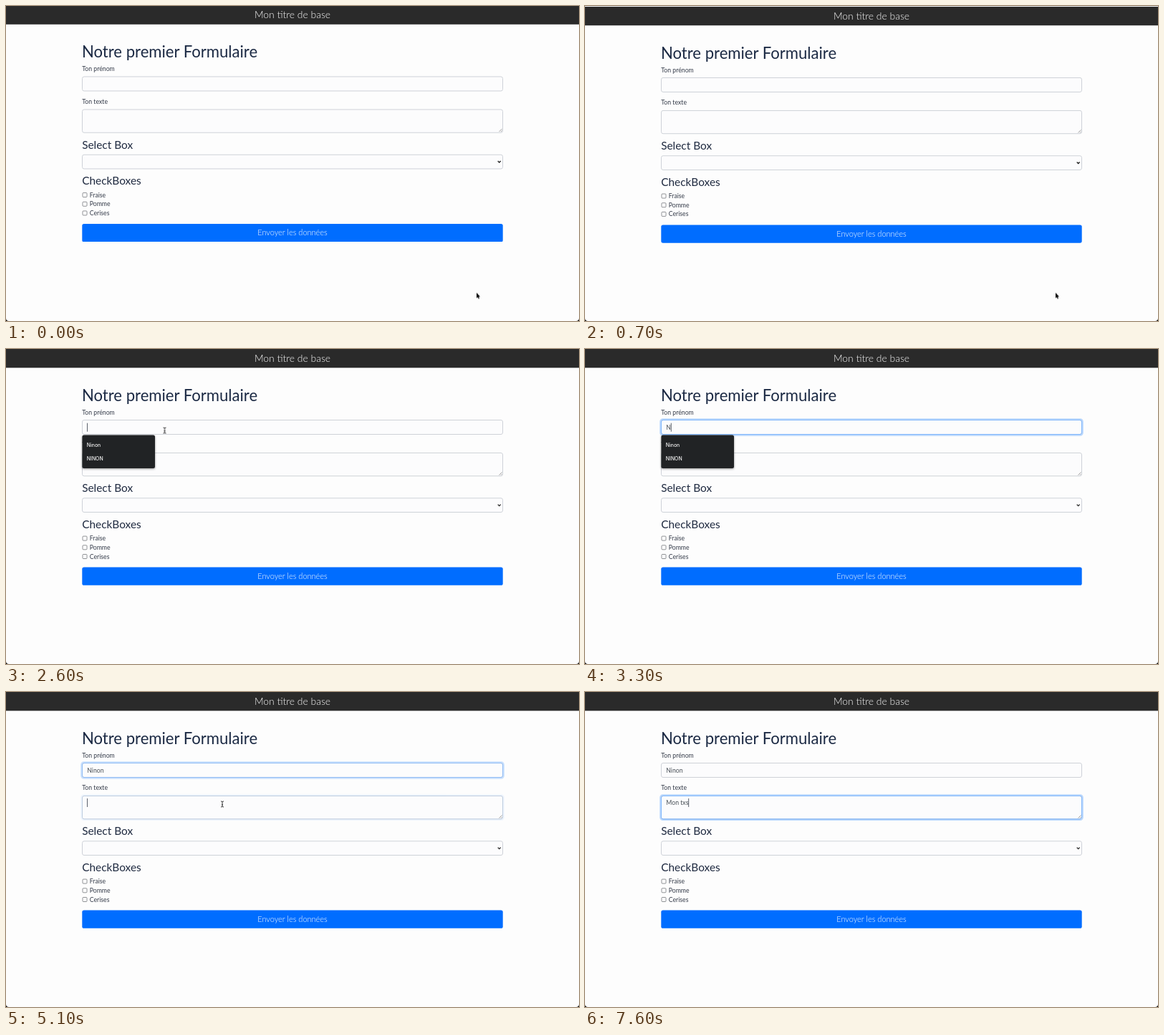
An HTML page that plays this animation: 800 by 441 pixels, repeating every 8000 ms.

```html
<!DOCTYPE html>
<html lang="fr">
<head>
<meta charset="utf-8">
<title>Formulaire</title>
<style>
html, body { margin: 0; width: 100%; height: 100%; overflow: hidden; background: #000; }
svg { display: block; width: 800px; height: 441px; }
text { font-family: Lato, "Open Sans", sans-serif; white-space: pre; }
.title { font-size: 13.9px; font-weight: 300; fill: #fff; text-anchor: middle; }
.h1 { font-size: 22.1px; fill: #1c2a44; }
.h2 { font-size: 15.4px; fill: #1f2a40; }
.label { font-size: 8.7px; fill: #343b49; }
.value { font-size: 8.7px; fill: #495057; }
.send { font-size: 11px; font-weight: 300; fill: #fff; text-anchor: middle; }
.hint { font: 500 6.9px Inter, sans-serif; fill: #f4f4f4; }
.box { fill: #fcfcfd; stroke: #ced2d8; }
.check { fill: #fff; stroke: #74777c; stroke-width: .8; }
.ring { fill: none; stroke: #80b6fb; }
.halo { fill: none; stroke: #0a78ff; stroke-opacity: .27; stroke-width: 2; }
.caret { fill: #343b49; }

.page, .cursor, .arrow, .beam, .popup, .focus { animation: 8s -30ms linear infinite; }
.page { animation-name: scroll; }
.cursor { animation-name: move; }
.arrow, .beam, .popup { animation-timing-function: step-end; }
.arrow { animation-name: arrow; }
.beam { animation-name: beam; }
.popup { animation-name: popup; }
.first { animation-name: first; }
.second { animation-name: second; }

@keyframes scroll {
  0% { transform: translateY(-.5px); }
  5% { transform: translateY(-1px); animation-timing-function: ease-in-out; }
  8.75% { transform: translateY(1.1px); animation-timing-function: ease-out; }
  12.5%, 100% { transform: none; }
}
@keyframes move {
  0%, 12% { transform: translate(657px, 401.5px); animation-timing-function: ease-in-out; }
  16.25%, 19.5% { transform: translate(435px, 343px); animation-timing-function: ease-in-out; }
  27.5%, 55% { transform: translate(221.5px, 114px); animation-timing-function: step-end; }
  56.25% { transform: translate(313.2px, 151px); animation-timing-function: ease-out; }
  63%, 100% { transform: translate(302px, 157px); }
}
@keyframes arrow { 0% { opacity: 1; } 24.75%, 100% { opacity: 0; } }
@keyframes beam {
  0% { opacity: 0; }
  24.75% { opacity: 1; }
  41.25% { opacity: 0; }
  56.25% { opacity: 1; }
  72.5%, 100% { opacity: 0; }
}
@keyframes popup { 0% { opacity: 0; } 32.5% { opacity: 1; } 63.75%, 100% { opacity: 0; } }
@keyframes first {
  0%, 32.9% { opacity: 0; }
  34.75%, 63.75% { opacity: 1; }
  65.6%, 100% { opacity: 0; }
}
@keyframes second { 0%, 63.75% { opacity: 0; } 65.6%, 100% { opacity: 1; } }
</style>
</head>
<body>
<svg viewBox="0 0 800 441">
  <path fill="#fdfdfd" d="M0 0H800V437Q800 441 796 441H4Q0 441 0 437Z"/>
  <g class="page">
    <rect y="0" width="800" height="26.3" fill="#2a2a2a"/>
    <text class="title" x="400" y="17.7">Mon titre de base</text>
    <text class="h1" x="106" y="72.6">Notre premier Formulaire</text>
    <text class="label" x="106.3" y="91.8">Ton prénom</text>
    <rect class="box" x="106.5" y="99.5" width="587" height="20" rx="2.5"/>
    <text class="label" x="106.3" y="137.2">Ton texte</text>
    <rect class="box" x="106.5" y="145.5" width="587" height="32.3" rx="2.5"/>
    <path d="M688.5 176.5l4-4M691 176.5l1.5-1.5" stroke="#777" stroke-width=".7"/>
    <text class="h2" x="106.2" y="200.2">Select Box</text>
    <rect class="box" x="106.5" y="208.8" width="587" height="19.7" rx="2.5"/>
    <path d="M686.7 217.6l2 2 2-2" fill="none" stroke="#222" stroke-width="1.3"/>
    <text class="h2" x="106.2" y="251">CheckBoxes</text>
    <g id="checks"></g>
    <rect x="106.3" y="305.6" width="587.4" height="25.2" rx="2.6" fill="#006dff"/>
    <text class="send" x="400" y="321.8">Envoyer les données</text>

    <g class="focus first">
      <rect class="halo" x="105.2" y="98.2" width="589.6" height="22.6" rx="3.5"/>
      <rect class="ring" x="106.5" y="99.5" width="587" height="20" rx="2.5"/>
    </g>
    <g class="focus second">
      <rect class="halo" x="105.2" y="144.2" width="589.6" height="34.9" rx="3.5"/>
      <rect class="ring" x="106.5" y="145.5" width="587" height="32.3" rx="2.5"/>
    </g>
    <text class="value" id="name" x="113.3" y="112.5"></text>
    <text class="value" id="note" x="113.3" y="158"></text>
    <rect class="caret" id="caret" width=".8" height="12"/>
  </g>

  <g class="popup">
    <rect x="106.4" y="120.5" width="101.6" height="46.4" rx="2.5" fill="#212325"
      style="filter: drop-shadow(0 1px 1.5px rgba(0,0,0,.4))"/>
    <text class="hint" x="112.8" y="136.5">Ninon</text>
    <text class="hint" x="112.8" y="155.6">NINON</text>
  </g>

  <g class="cursor">
    <path class="arrow" d="M0 0V7.4L1.7 5.9 2.8 8.5 4 8 2.9 5.4H5.1Z"
      stroke="#fff" stroke-width=".6" paint-order="stroke"/>
    <path class="beam" d="M-2-4Q0-4 0-3Q0-4 2-4M0-3V3M-2 4Q0 4 0 3Q0 4 2 4M-1 .9H1"
      fill="none" stroke="#222" stroke-width=".9"/>
  </g>
</svg>
<script>
const $ = id => document.getElementById(id);

$('checks').innerHTML = ['Fraise', 'Pomme', 'Cerises'].map((word, i) => {
  const y = 265.1 + i * 12.7;
  return `<rect class="check" x="107" y="${y - 3}" width="6" height="6" rx="1"/>
    <text class="label" x="116.8" y="${y + 3}">${word}</text>`;
}).join('');

// The first time of each field is its focus, the others are key presses.
const fields = [
  { node: $('name'), text: 'Ninon', top: 103.7, times: [2600, 3300, 3600, 3700, 3900, 4100] },
  { node: $('note'), text: 'Mon txs', top: 149, times: [5100, 5800, 6000, 6300, 6400, 7100, 7400, 7600] }
];
const caret = $('caret');
let start;

function draw(now) {
  start ??= now;
  const t = (now - start + 30) % 8000;
  let on = false;
  for (const { node, text, top, times } of fields) {
    const past = times.filter(time => time <= t);
    const typed = text.slice(0, Math.max(0, past.length - 1));
    if (node.textContent !== typed) node.textContent = typed;
    if (!past.length) continue;
    on = (t - past.at(-1)) % 1000 < 500;
    caret.setAttribute('x', 113.2 + (typed ? node.getComputedTextLength() : 0));
    caret.setAttribute('y', top);
  }
  caret.style.opacity = on ? 1 : 0;
  requestAnimationFrame(draw);
}
requestAnimationFrame(draw);
</script>
</body>
</html>
```
